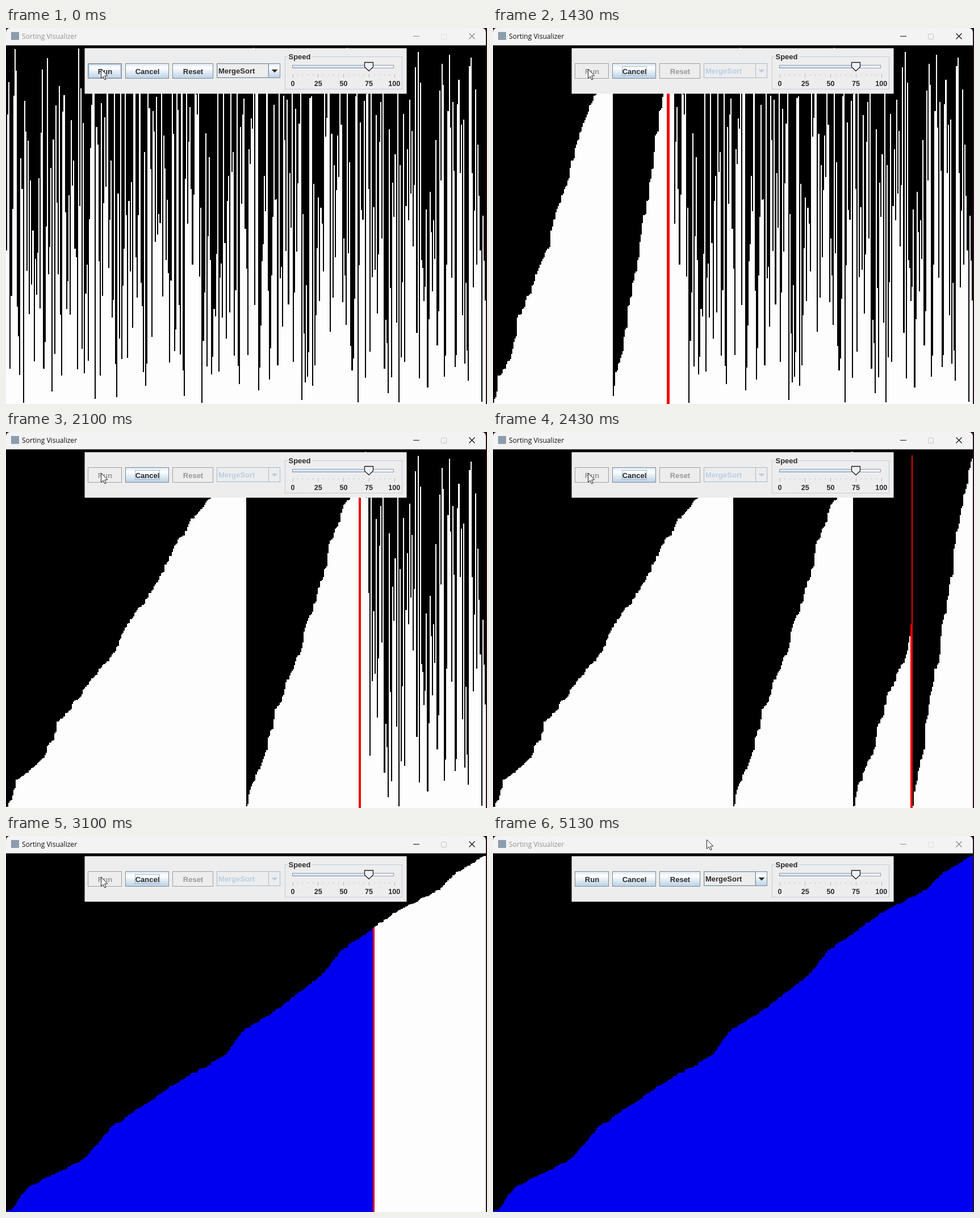
These frames come from a looping animation (847 by 661 pixels, 5.16 s). An HTML page with a canvas:

```html
<!DOCTYPE html>
<html lang="en">
<head>
<meta charset="utf-8">
<title>Sorting Visualizer</title>
<style>
html, body { margin: 0; width: 100%; height: 100%; overflow: hidden; background: #000; }
canvas { display: block; }
</style>
</head>
<body>
<canvas id="stage" width="847" height="661"></canvas>
<script>
const ctx = document.getElementById('stage').getContext('2d');
const LOOP = 5160, N = 400, RUNS = 16, W = 845, H = 661;
const UI = '"Liberation Sans", Arial, sans-serif';

// Times of the main events, in ms
const WAKE = 70, START = 380, STEADY = 1130, SWEEP = 2776, DONE = 3200, SLEEP = 4980;

// Outline of the sorted bars, as x, y pairs
const outline = [0,661, 8,658, 38,618, 137,568, 185,513, 296,436, 384,387, 417,343,
  478,305, 560,241, 588,203, 692,130, 765,93, 790,67, 845,33];

function lerpKeys(keys, x) {
  let i = 0;
  while (i < keys.length - 4 && x > keys[i + 2]) i += 2;
  const [x0, y0, x1, y1] = keys.slice(i, i + 4);
  const p = Math.min(1, Math.max(0, (x - x0) / (x1 - x0)));
  return y0 + (y1 - y0) * p;
}

let seed = 20417;
function rand() {
  seed = (seed * 1664525 + 1013904223) >>> 0;
  return seed / 4294967296;
}

function shuffle(a) {
  for (let i = a.length - 1; i > 0; i--) {
    const j = Math.floor(rand() * (i + 1));
    [a[i], a[j]] = [a[j], a[i]];
  }
  return a;
}

// Deal the heights evenly into runs, then mix each run
function makeBars() {
  const tops = Array.from({ length: N }, (_, i) =>
    Math.min(H, lerpKeys(outline, (i + 0.5) * W / N) + rand() * 5 - 2.5));
  tops.sort((a, b) => b - a);
  const runs = Array.from({ length: RUNS }, () => []);
  while (tops.length) shuffle(tops.splice(0, RUNS)).forEach((v, i) => runs[i].push(v));
  return runs.flatMap(shuffle);
}

const bars = makeBars(), writes = [];

function mergeSort(a, lo, hi) {
  if (hi - lo < 2) return;
  const mid = (lo + hi + 1) >> 1;
  mergeSort(a, lo, mid);
  mergeSort(a, mid, hi);
  const l = a.slice(lo, mid), r = a.slice(mid, hi);
  for (let k = lo, i = 0, j = 0; k < hi; k++) {
    a[k] = j >= r.length || (i < l.length && l[i] >= r[j]) ? l[i++] : r[j++];
    writes.push([k, a[k]]);
  }
}
mergeSort(bars.slice(), 0, N);

// The sort speeds up at first, then runs at a nearly steady pace
function writeCount(t) {
  if (t < START) return 0;
  if (t < STEADY) return Math.floor(398 * ((t - START) / (STEADY - START)) ** 2);
  return Math.floor(lerpKeys([STEADY, 398, 1730, 1508, 2430, 2836, SWEEP, writes.length], t));
}

function rect(x, y, w, h, fill) {
  ctx.fillStyle = fill;
  ctx.fillRect(x, y, w, h);
}

function frame(x, y, w, h, color) {
  ctx.strokeStyle = color;
  ctx.lineWidth = 1;
  ctx.strokeRect(x + 0.5, y + 0.5, w - 1, h - 1);
}

function path(points, stroke, fill, width = 1) {
  ctx.beginPath();
  for (let i = 0; i < points.length; i += 2) ctx.lineTo(points[i], points[i + 1]);
  if (fill) {
    ctx.closePath();
    ctx.fillStyle = fill;
    ctx.fill();
  }
  if (stroke) {
    ctx.strokeStyle = stroke;
    ctx.lineWidth = width;
    ctx.stroke();
  }
}

function text(str, x, y, color, font, align = 'left') {
  ctx.font = font;
  ctx.textAlign = align;
  ctx.fillStyle = color;
  ctx.fillText(str, x, y);
}

const bold = size => `bold ${size}px ${UI}`;

function metal(y, h) {
  const g = ctx.createLinearGradient(0, y, 0, y + h);
  g.addColorStop(0, '#dbe7f2');
  g.addColorStop(0.3, '#ffffff');
  g.addColorStop(0.5, '#eaf1f7');
  g.addColorStop(1, '#b8cfe5');
  return g;
}

function drawBars(t) {
  const now = bars.slice(), count = writeCount(t);
  for (let i = 0; i < count; i++) now[writes[i][0]] = writes[i][1];
  const sorting = t < SWEEP && count > 0;
  const at = sorting ? writes[count - 1][0] : -9;
  const swept = t < SWEEP ? -1 : Math.min(N, Math.floor((t - SWEEP) / (DONE - SWEEP) * N));
  now.forEach((top, i) => {
    const x = Math.round(i * W / N), y = Math.round(top);
    const red = i === at || i === at + 1 || i === swept;
    const color = red ? '#f00000' : i < swept ? '#0000f0' : '#fdfdfd';
    rect(x, y, Math.round((i + 1) * W / N) - x, H - y, color);
  });
}

function drawTitle(active) {
  ctx.beginPath();
  ctx.roundRect(0, 0, W, 30.5, [7, 7, 0, 0]);
  ctx.fillStyle = '#f3f3f3';
  ctx.fill();
  rect(9, 7, 14, 14, '#8c9dac');
  text('Sorting Visualizer', 28, 19, active ? '#111' : '#939393',
    '12.1px "Open Sans", "Noto Sans", sans-serif');
  const ink = active ? '#111' : '#8a8a8a';
  rect(717, 14, 11, 1, ink);
  ctx.beginPath();
  ctx.roundRect(766.5, 10.5, 9, 9, 1);
  ctx.strokeStyle = active ? '#c3c3c8' : '#dcdce2';
  ctx.lineWidth = 1;
  ctx.stroke();
  path([815.5, 9.5, 825.5, 19.5], ink, null, 1.2);
  path([825.5, 9.5, 815.5, 19.5], ink, null, 1.2);
}

function button(label, x, w, on, focus, hot) {
  if (on) rect(x, 62, w, 27, metal(62, 27));
  frame(x, 62, w, 27, on ? '#7a8a99' : '#a0a0a0');
  if (hot) {
    frame(x + 1, 63, w - 2, 25, '#a3b8cc');
    frame(x + 2, 64, w - 4, 23, '#c2d5e7');
  }
  text(label, x + w / 2 + 0.5, 81, on ? '#2b2b2b' : '#999', bold(13), 'center');
  if (focus) frame(227, 67, 44, 17, '#a3b8cc');
}

function combo(on) {
  const edge = on ? '#7a8a99' : '#a3b8cc';
  if (on) rect(463, 62, 20, 26, metal(62, 26));
  frame(371, 62, 112, 26, edge);
  rect(462, 62, 1, 26, edge);
  if (on) frame(372, 63, 90, 24, '#c5d5e4');
  text('MergeSort', 374, 80, on ? '#2b2b2b' : '#b8cfe5', bold(13));
  path([467.5, 73, 478.5, 73, 473, 78.5], null, on ? '#2b2b2b' : '#b8cfe5');
}

function slider() {
  frame(491, 50, 207, 58, '#c0cdd9');
  rect(496, 48, 43, 6, '#ededed');
  text('Speed', 497.5, 55, '#2b2b2b', bold(13));
  rect(504, 65, 179, 7, '#f4f6fa');
  frame(504, 65, 179, 6, '#8c98b4');
  rect(505, 66, 134, 4, '#dfe8f3');
  rect(505, 69, 134, 1, '#b8cfe5');
  for (let i = 0; i <= 20; i++) {
    const major = i % 5 === 0;
    rect(Math.round(504.5 + i * 8.95), 81, 1, major ? 6 : 3, major ? '#a3b8cc' : '#c3cfdb');
  }
  [0, 25, 50, 75, 100].forEach((n, i) =>
    text(n, 505 + i * 44.7, 102, '#2b2b2b', bold(12.6), 'center'));
  path([631.5, 60.5, 646.5, 60.5, 646.5, 68.5, 639, 75.5, 631.5, 68.5], '#222', '#eef2f6', 1.3);
}

function drawPanel(t) {
  rect(138.5, 35.5, 567, 80, '#ededed');
  const idle = t < START || t >= DONE;
  button('Run', 144, 60, idle, false, t < START);
  button('Cancel', 210, 77, true, t >= START && t < SLEEP, false);
  button('Reset', 293, 72, idle, false, false);
  combo(idle);
  slider();
}

function drawCursor(t) {
  const x = lerpKeys([3650, 167, 4080, 273, 4250, 273, 4700, 376], t);
  const y = lerpKeys([3650, 72, 4080, 2, 4250, 2, 4700, 6], t);
  ctx.save();
  ctx.translate(x + 0.5, y + 0.5);
  path([0, 0, 0, 16, 3.7, 12.6, 6.3, 18.4, 8.7, 17.3, 6.2, 11.7, 11.3, 11.3, 0, 0], '#222', '#fff');
  ctx.restore();
}

function draw() {
  const t = performance.now() % LOOP;
  rect(0, 0, 847, H, '#2a1018');
  rect(0, 30, W, H - 30, '#000');
  drawBars(t);
  drawTitle(t >= WAKE && t < SLEEP);
  drawPanel(t);
  drawCursor(t);
  requestAnimationFrame(draw);
}
draw();
</script>
</body>
</html>
```
